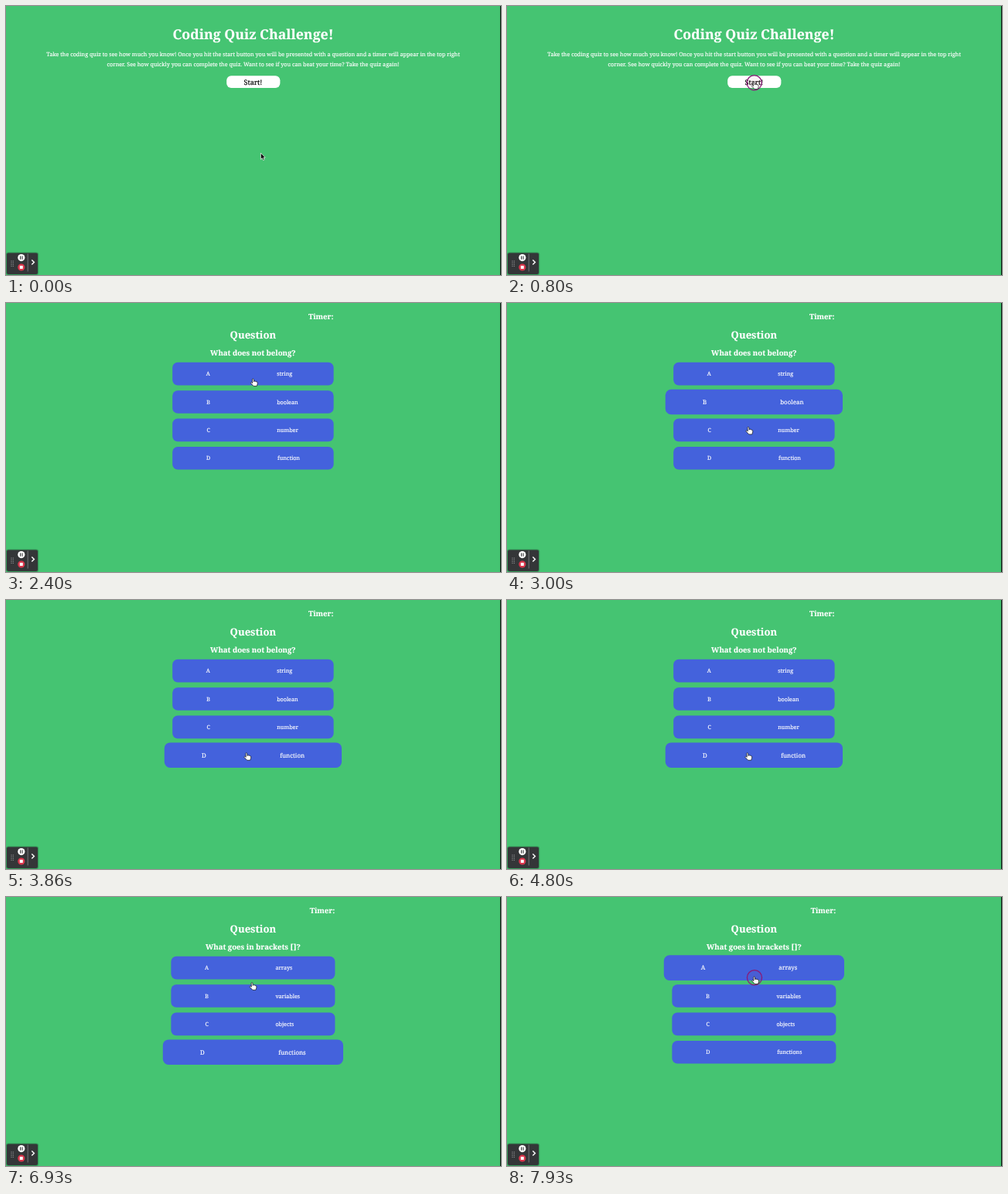
An HTML page for the animation above (8 s loop, 640 by 348 pixels).

```html
<!DOCTYPE html>
<html lang="en">
<head>
<meta charset="utf-8">
<title>Coding quiz</title>
<style>
  html, body { margin: 0; width: 100%; height: 100%; overflow: hidden; background: #45c472; }
  svg { display: block; width: 100%; height: 100%; }
  text {
    font-family: "Noto Serif", Georgia, serif; font-size: 7.19px;
    fill: #fff; stroke: #fff; stroke-width: .16px; text-rendering: geometricPrecision;
  }
  .mid { text-anchor: middle; }
  .end { text-anchor: end; }
  .bold { font-weight: 700; font-size: 9.65px; }
  .title { font-size: 17.7px; }
  .heading { font-size: 13.1px; }
  .start { font-size: 9.1px; fill: #000; stroke: #000; }
  .option rect { fill: #4462dc; }
</style>
</head>
<body>
<svg viewBox="0 0 640 348" preserveAspectRatio="none">
  <rect width="640" height="348" fill="#45c472"/>

  <g id="intro">
    <text class="mid bold title" x="319.5" y="42.6">Coding Quiz Challenge!</text>
    <text class="mid" x="319.5" y="64.5">Take the coding quiz to see how much you know! Once you hit the start button you will be presented with a question and a timer will appear in the top right</text>
    <text class="mid" x="319.5" y="77.8">corner. See how quickly you can complete the quiz. Want to see if you can beat your time? Take the quiz again!</text>
    <rect x="285.2" y="90.3" width="69.2" height="15.6" rx="6" fill="#fff"/>
    <text class="mid start" x="319.4" y="101.5">Start!</text>
  </g>
  <g id="quizzes"></g>

  <rect x="638.9" width="1.1" height="348" fill="#0c140f"/>

  <g id="recorder">
    <rect x="0" y="318.4" width="42.2" height="29.6" rx="3" fill="#000" opacity=".22"/>
    <rect x="1" y="319.5" width="40" height="27.5" rx="2" fill="#343638"/>
    <path d="M7 329.5v8M9.3 329.5v8" stroke="#a5a7a9" stroke-dasharray="1 1.2"/>
    <circle cx="19.8" cy="325.6" r="4.6" fill="#fff"/>
    <path d="M18.6 323.4v4.4M21 323.4v4.4" stroke="#343638" stroke-width="1.1"/>
    <circle cx="19.8" cy="338" r="4.6" fill="#d9364c"/>
    <rect x="17.8" y="336" width="4" height="4" rx=".6" fill="#fff"/>
    <path d="M28.2 320.5v23" stroke="#85888b" stroke-width=".8"/>
    <path d="M33.3 328.6l3.1 3-3.1 3" fill="none" stroke="#fff" stroke-width="1.4"/>
  </g>

  <circle id="ring" r="9.6" fill="#b01050" fill-opacity=".05" stroke="#8a1a78" stroke-width="1.3"/>
  <g id="cursor" stroke-linejoin="round">
    <path id="arrow" d="M0 0v8.2l1.9-1.7 1.3 2.9 1.5-.7-1.3-2.8h2.5z" fill="#000" stroke="#fff" stroke-width=".7"/>
    <path id="hand" transform="scale(1.12 1.03)" d="M0 .7C0-.3 1.5-.3 1.6.7l.3 3 .3-.8c.4-.4 1.2-.2 1.3.5.4-.4 1.2-.2 1.3.5.5-.3 1.2 0 1.2.7v1.8L5.2 9.2H1.6L-1.6 5.6c-.5-.8.4-1.5 1.1-1l.8.8z" fill="#fff" stroke="#111" stroke-width=".65"/>
  </g>
</svg>

<script>
const LOOP = 8000, CENTER = 319.4;
const ROW_Y = [91.6, 128, 164.4, 200.7];
const QUIZZES = [
  { ask: "What does not belong?", answers: ["string", "boolean", "number", "function"], width: 208.4 },
  { ask: "What goes in brackets []?", answers: ["arrays", "variables", "objects", "functions"], width: 212 }
];
// [time, value], held until the next step
const SCREEN = [[0, 0], [930, 1], [5260, 2]];
const HOVER = [[0, -1], [2660, 0], [2870, 1], [3070, 2], [3530, 3], [7000, 0]];
const CLICK = [[0, 0], [730, 1], [930, 0], [4930, 1], [5130, 0], [7860, 1]];
// [time, x, y] of the pointer tip
const POINTER = [
  [0, 329.4, 190.2], [200, 329.4, 190.2], [600, 318.4, 98.1], [2600, 318.4, 98.1],
  [3000, 311, 160.4], [3330, 311, 160.6], [3600, 309.9, 197.8], [6730, 309.9, 197.8],
  [6930, 317.1, 110.8], [7000, 318.7, 103.1], [8000, 318.7, 103.1]
];

const byId = id => document.getElementById(id);
const show = (node, on) => node.setAttribute("visibility", on ? "visible" : "hidden");

function add(parent, tag, attrs, text = "") {
  const node = document.createElementNS("http://www.w3.org/2000/svg", tag);
  for (const key in attrs) node.setAttribute(key, attrs[key]);
  node.textContent = text;
  return parent.appendChild(node);
}

function buildQuiz({ ask, answers, width }) {
  const group = add(byId("quizzes"), "g", {});
  const left = CENTER - width / 2;
  add(group, "text", { class: "end bold", x: left + width - .1, y: 20.5 }, "Timer:");
  add(group, "text", { class: "mid bold heading", x: CENTER, y: 45.5 }, "Question");
  add(group, "text", { class: "mid bold", x: CENTER, y: 68 }, ask);
  const options = answers.map((answer, i) => {
    const option = add(group, "g", { class: "option" });
    add(option, "rect", { x: left, y: -14.8, width, height: 29.6, rx: 6.8 });
    add(option, "text", { class: "mid", x: left + 46.2 + i * .1, y: 2.6 }, "ABCD"[i]);
    add(option, "text", { x: left + 135 + (i === 3 ? .8 : 0), y: 2.6 }, answer);
    return option;
  });
  return { group, options };
}

const quizzes = QUIZZES.map(buildQuiz);
const held = (steps, t) => steps.filter(step => step[0] <= t).pop()[1];

function pointerAt(t) {
  const i = POINTER.findIndex(point => point[0] > t);
  const [t0, x0, y0] = POINTER[i - 1], [t1, x1, y1] = POINTER[i];
  const k = (t - t0) / (t1 - t0), ease = k * k * (3 - 2 * k);
  return [x0 + (x1 - x0) * ease, y0 + (y1 - y0) * ease];
}

function draw(t) {
  const screen = held(SCREEN, t), hover = held(HOVER, t);
  show(byId("intro"), screen === 0);
  quizzes.forEach(({ group, options }, q) => {
    show(group, screen === q + 1);
    options.forEach((option, i) => {
      const scale = i === hover ? 1.1 : 1;
      option.setAttribute("transform",
        `translate(${CENTER} ${ROW_Y[i]}) scale(${scale}) translate(${-CENTER} 0)`);
    });
  });

  const [x, y] = pointerAt(t);
  const overButton = screen > 0 || y < 106;
  byId("cursor").setAttribute("transform", `translate(${x} ${y})`);
  show(byId("arrow"), !overButton);
  show(byId("hand"), overButton);
  byId("ring").setAttribute("transform", `translate(${x + 1.3} ${y + 1.2})`);
  show(byId("ring"), held(CLICK, t));
}

const began = performance.now();
function tick() {
  draw((performance.now() - began) % LOOP);
  requestAnimationFrame(tick);
}
tick();
</script>
</body>
</html>
```
